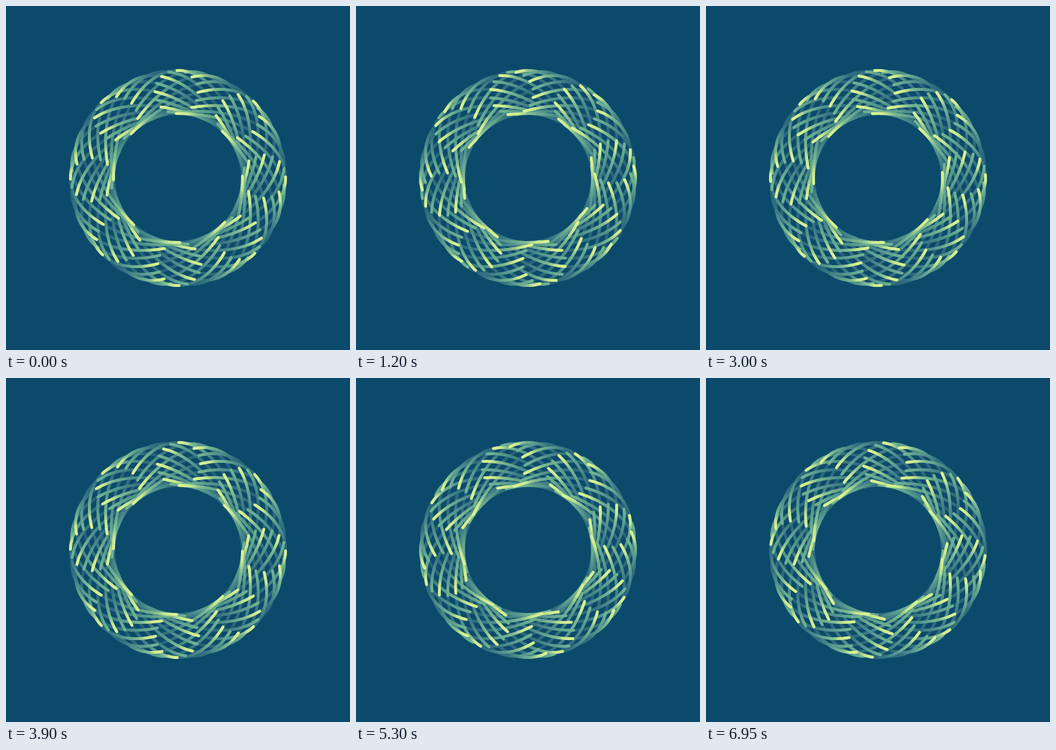
An HTML page with a canvas that plays this animation: 600 px wide and 600 px high, repeating every 7000 ms.

```html
<!DOCTYPE html>
<html lang="en">
<head>
<meta charset="utf-8">
<title>Woven ring</title>
<style>
  html, body { margin: 0; width: 100%; height: 100%; overflow: hidden; background: #0c4a6c; }
  canvas { display: block; }
</style>
</head>
<body>
<canvas id="stage" width="600" height="600"></canvas>
<script>
const ctx = document.getElementById('stage').getContext('2d');
const LOOP = 7000, STEP = 50, RAD = Math.PI / 180;
const BIG = 150, SMALL = 37.6, GAP = 45, SLICE = 1.5;

// [time in ms, turn in degrees]
const TURN = [[0, 1], [1200, 55.8], [3000, 138], [3900, 179.4], [5300, 241.4],
              [6050, 292.6], [6950, 355.1], [7000, 361]];

// [degrees behind the head, r, g, b]
const BRIGHT = [[0, 216, 241, 146], [5, 200, 230, 142], [10, 128, 188, 145],
                [22, 84, 150, 141], [34, 52, 115, 129], [45, 36, 97, 121]];
const DIM = [[0, 110, 178, 146], [12, 84, 150, 141], [25, 52, 115, 129], [45, 33, 93, 119]];

function lerpStops(stops, x) {
  let i = 1;
  while (i < stops.length - 1 && x > stops[i][0]) i++;
  const a = stops[i - 1], b = stops[i], f = (x - a[0]) / (b[0] - a[0]);
  return a.slice(1).map((v, n) => v + (b[n + 1] - v) * f);
}

// The large arm turns one way, the small arm the other.
function point(turn, k, j) {
  const a = (-90 - turn + 45 * k) * RAD, b = (-90 + turn + 22.5 * j) * RAD;
  return [300 + BIG * Math.cos(a) + SMALL * Math.cos(b),
          300 + BIG * Math.sin(a) + SMALL * Math.sin(b)];
}

function drawTrails(turn, stops, first) {
  for (let lag = GAP - SLICE; lag >= 0; lag -= SLICE) {
    ctx.strokeStyle = `rgb(${lerpStops(stops, lag).map(Math.round)})`;
    ctx.beginPath();
    for (let k = 0; k < 8; k++) {
      for (let j = first; j < 16; j += 2) {
        ctx.moveTo(...point(turn - lag, k, j));
        ctx.lineTo(...point(turn - lag - SLICE, k, j));
      }
    }
    ctx.stroke();
  }
}

function draw(time) {
  const turn = lerpStops(TURN, time)[0];
  ctx.globalCompositeOperation = 'source-over';
  ctx.fillStyle = '#0c4a6c';
  ctx.fillRect(0, 0, 600, 600);
  ctx.globalCompositeOperation = 'lighten';
  ctx.lineWidth = 5;
  ctx.lineCap = 'round';
  drawTrails(turn, DIM, 1);
  drawTrails(turn, BRIGHT, 0);
}

const start = performance.now();
let shown = -1;
function tick() {
  const time = Math.floor((performance.now() - start) % LOOP / STEP) * STEP;
  if (time !== shown) draw(shown = time);
  requestAnimationFrame(tick);
}
tick();
</script>
</body>
</html>
```
